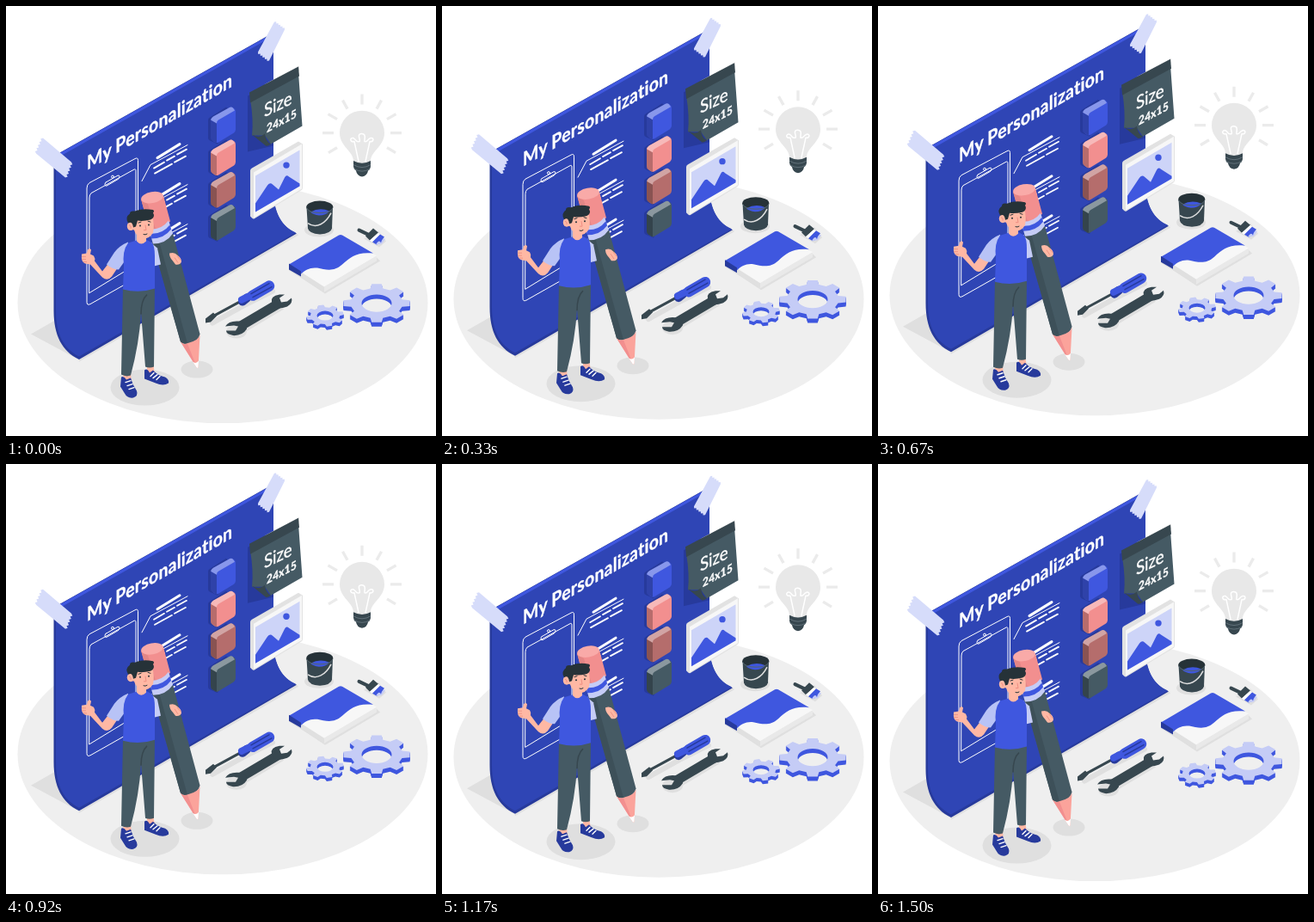
Write an HTML page that moves like this. It is 500x500 px and loops after 1540 ms.

```html
<!DOCTYPE html>
<html lang="en">
<head>
<meta charset="utf-8">
<title>My Personalization</title>
<style>
  html, body { margin: 0; height: 100%; overflow: hidden; background: #fff; }
  svg { display: block; width: 100vw; height: 100vh; }
  .blue { fill: #3f57df; } .navy { fill: #273a9c; } .pale { fill: #c5ccf6; }
  .gray { fill: #455a64; } .dark { fill: #37474f; } .ink { fill: #263238; }
  .skin { fill: #ffb8a4; } .shade { fill: #dfdfdf; }
  .line { fill: none; stroke: #fff; stroke-linecap: round; stroke-linejoin: round; }
  text { fill: #fff; stroke: #fff; stroke-width: .4; font-family: Lato, sans-serif; }
</style>
</head>
<body>
<svg viewBox="0 0 500 500">
  <defs>
    <g id="swatch">
      <path class="navy" d="M235 132Q235 130 237 129L256 117L262 122L246 160L237 156Q235 155 235 153Z"/>
      <path d="M238 133Q238 130 241 128L259 118Q262 116 264 118Q267 119 267 123V143Q267 145 265 147L247 158Q245 159 243 158L240 156Q238 155 238 152Z"/>
      <path fill="#000" opacity=".24" d="M238 132L245 136V158Q244 159 242 157L240 156Q238 155 238 152Z"/>
      <path fill="#fff" opacity=".38" d="M238 132Q239 129 241 128L259 118Q262 116 264 118L266 121L247 132Q245 133 245 136Z"/>
    </g>
    <g id="note" class="line">
      <path stroke-width="1" d="M158 203L168 184L211 161"/>
      <path stroke-width="3" d="M176 176L202 160"/>
      <path stroke-width="1.800" d="M172 188L184 181M187 179L196 174M199 172L210 166M173 194L193 183M196 181L209 174"/>
    </g>
  </defs>

  <g id="scene">
    <ellipse cx="252" cy="344.500" rx="238.500" ry="140" fill="#efefef"/>

    <!-- poster -->
    <path class="shade" d="M29 381L57 365L85 411Z"/>
    <path fill="#e0e0e0" d="M85 413L340 266L337 263L84 409Z"/>
    <path class="navy" d="M55.500 174L310 31V216C312 241 321 257 338 264L85 410.500C65 401 55.500 382 55.500 354Z"/>
    <path class="blue" d="M55.500 174.500L311 31V36L58 178Z"/>
    <path fill="#2f45b5" d="M58 177L311 34.500V216C312 241 321 256 337 263L85 407C67 398 58 381 58 354Z"/>
    <text transform="matrix(.866 -.5 0 1 94 190.500)" font-size="22.500" font-weight="700" letter-spacing=".25">My Personalization</text>

    <g class="line">
      <path d="M94 211Q94 207 97 205L150 177Q153.500 175 153.500 179V310Q153.500 314 151 316L98 346Q94 348 94 344Z"/>
      <path d="M97 222Q97 219 99 217L148 190Q151 188 151 191V300L97 333Z"/>
      <path d="M116 204.500L130 196.500Q132 196 132 198T130 201L117 208.500Q115 209 115 207T116 204.500Z"/>
      <circle cx="124" cy="198" r="1.500"/>
    </g>
    <use href="#note"/><use href="#note" y="46"/><use href="#note" y="92"/>
    <use href="#swatch" fill="#3f57df"/>
    <use href="#swatch" y="38" fill="#f28f8f"/>
    <use href="#swatch" y="75.500" fill="#b56d6c"/>
    <use href="#swatch" y="113.500" fill="#455a64"/>

    <!-- size note -->
    <path class="navy" d="M281 104L311 88V162L281 169Z"/>
    <path fill="#e6e6e6" d="M300 91L341 69V75Z"/>
    <path class="gray" d="M284 108L340 77L344.500 139L308 160L301 150L286 150Q288 132 284 108Z"/>
    <path class="dark" d="M283 100L340 70L341 81L284 112Z"/>
    <path class="dark" d="M286 149Q295 154 301 148Q302 157 308 160Q304 163 302 162Z"/>
    <text transform="matrix(.87 -.42 0 1 300 129)" font-size="21.500">Size</text>
    <text transform="matrix(.87 -.46 0 1 303 147)" font-size="13.500" font-weight="700" letter-spacing=".4">24x15</text>

    <!-- picture card -->
    <path fill="#e2e2e2" d="M284 191Q284 189 286 188L340 157L345 160V211Q345 213 343 214L290 246Q288 248 286 246L284 244Z"/>
    <path fill="#f7f7f7" d="M288 193L344 160V212L288 246Z"/>
    <path fill="#cdd4f8" d="M290 197L341.500 167V209L290 239Z"/>
    <path class="blue" d="M290 229L304 208Q307 204 310 207L317 213L324 199Q326 195 329 198L341.500 206V209L290 239Z"/>
    <circle class="blue" cx="326" cy="184.500" r="3.700"/>

    <!-- light bulb -->
    <path stroke="#ebebeb" stroke-width="3.300" d="M414 102V114M391.500 109L397 119M436.500 109L431 119M374.500 125L385 131M453.500 125L443 131M368 147H381M447 147H460M375 170L385 164M453 170L443 164"/>
    <path fill="#e8e8e8" d="M404 180C404 168 388 163 388 147A26 26 0 0 1 440 147C440 163 424 168 424 180Q414 185 404 180Z"/>
    <path class="line" stroke-width="1.500" d="M410 180L405 157C399 158 400 152 404 153C408 155 406 158 411 157C413 156 407 148 413.500 148S416 156 417 157C421 158 420 154 424 153C428 152 428 158 423 157L418 180"/>
    <path class="dark" d="M404 179.500Q414 185 424 179.500V185Q424 189 421 191Q420 197 414 198Q408 197 407 191Q404 189 404 186Z"/>
    <path fill="none" stroke="#6c7c85" stroke-width=".8" d="M404 184Q414 190 424 184M405 189Q414 194 423 189"/>

    <!-- bucket -->
    <ellipse class="shade" cx="364" cy="260" rx="17" ry="8"/>
    <path class="dark" d="M349.500 233L351 258Q352 264 365 265Q378 264 379 258L380 233Z"/>
    <ellipse class="ink" cx="364.800" cy="233" rx="15.500" ry="7"/>
    <path class="blue" d="M354 239Q365 233 376 238Q372 243 364 243Q357 242 354 239Z"/>
    <path fill="none" stroke="#53656e" d="M349.500 234Q352 240 365 240T380 234"/>
    <path fill="none" stroke="#e0e0e0" stroke-width="1.500" d="M351 252C361 259 372 252 378 240"/>

    <!-- brush -->
    <path class="shade" d="M416 270L433 261L442 273L434 280Z"/>
    <path stroke="#37474f" stroke-width="4" stroke-linecap="round" d="M410.500 260L421 265"/>
    <path class="dark" d="M418 267L427 258L433 263L423 272Z"/>
    <path fill="#fff" d="M423 272L433 263L435 265L426 274Z"/>
    <path class="blue" d="M426 274L435 265L440 268Q437 271 438 274L431 277Z"/>
    <path class="pale" d="M430 277Q434 270 436 275Q437 269 441 270L437 276Z"/>

    <!-- painted panel -->
    <path class="shade" d="M329 306L371 334L435 296L428 289Z"/>
    <path fill="#e0e0e0" d="M329 300V307L370 332V326Z"/>
    <path fill="#e9e9e9" d="M370 326V332L431 296V290Z"/>
    <path fill="#f7f7f7" d="M329 300L389 265L431 290L370 326Z"/>
    <path class="blue" d="M329 300L387 266Q389 265 391 266L427 287C408 285 401 291 391 300C381 309 372 306 362 304C354 303 348 306 343 311Z"/>
    <path class="navy" d="M329 299L343 308V314L329 306Z"/>

    <g id="gears"></g>

    <!-- screwdriver -->
    <g fill="none" stroke-linecap="round">
      <path stroke="#dfdfdf" stroke-width="6" d="M240 368L276 348L310 331"/>
      <path stroke="#37474f" stroke-width="3" d="M241 360L276 341"/>
      <path stroke="#273a9c" stroke-width="10" d="M275 343L280 339"/>
      <path stroke="#3f57df" stroke-width="12.500" d="M287 336L306 325"/>
      <path stroke="#3f57df" stroke-width="8" d="M274 341L290 333"/>
      <path stroke="#273a9c" stroke-width="1.500" d="M285 334L306 322M287 338L309 326"/>
    </g>
    <path class="dark" d="M232 363L241 356L245 360L238 367L232 368Z"/>

    <!-- wrench -->
    <g class="shade" transform="translate(1 4)">
      <path d="M270 369L315 342L322 348L275 376Z"/>
      <ellipse cx="267" cy="374" rx="12" ry="8"/>
    </g>
    <g class="dark">
      <path d="M268 368L312 342L322 349L278 375Z"/>
      <path d="M255 372Q259 365 271 366Q282 368 280 375Q275 383 264 382.500Q256 381 256 377L267 377L270 372L265 371Z"/>
      <path d="M309 344Q307 337 318 335L324 335L318 339L320 344L327 343L332 339Q334 345 327 349Q316 353 311 349Z"/>
    </g>

    <!-- pencil -->
    <ellipse class="shade" cx="222" cy="422" rx="18.500" ry="10"/>
    <ellipse class="shade" cx="161.500" cy="443" rx="40" ry="21"/>
    <path class="gray" d="M170 273L194 264L225.500 381Q224 388 216 391Q207 394 203 390Z"/>
    <path fill="#3d5059" d="M170 274L178 273L211 392Q205 393 203 390Z"/>
    <path fill="#fba39b" d="M203 390Q206 394 213 391Q224 388 225.500 382L223.500 420Q222 421 221 419Z"/>
    <path fill="#f28f8f" d="M203 390Q206 394 211 392L222 420Z"/>
    <path fill="#fff" d="M217 413Q221 416 224 412L223.500 420Q222 421 221 419Z"/>
    <path fill="#f28f8f" d="M157 224L183 220L191 250Q180 260 167 260Z"/>
    <path fill="#e38686" d="M157 224L165 230L174 259L167 260Z"/>
    <ellipse fill="#f9aaa8" cx="170" cy="222" rx="13" ry="6.500" transform="rotate(-10 170 222)"/>
    <path class="pale" d="M166 259Q181 260 189 249L194 264Q186 276 171 276Z"/>
    <path class="blue" d="M168 264Q182 265 190.500 254L192 259Q184 270 169 270Z"/>

    <!-- person -->
    <path class="pale" d="M170 276L176 281L180 300L172 302Z"/>
    <path class="skin" d="M136 426H145L146 438H137ZM163 414H171L173 428H165ZM152 262H163V279H152Z"/>
    <path class="navy" d="M134 431Q137 429 140 434L145 432Q147 440 152 447Q154 453 148 455Q141 456 138 450L133 442ZM161 423Q164 420 167 426L171 423Q176 429 185 431Q190 434 189 438Q183 442 174 438L161 433Z"/>
    <path class="line" stroke-width="1.400" d="M139 437L145 435M141 441L147 439M143 445L149 443M168 430L172 426M171 432L176 428M175 434L179 430"/>
    <path class="gray" d="M136 326L173 325L172 419Q167 421 162 419L157 356Q155 392 145 429Q140 431 134 428Z"/>
    <path fill="none" stroke="#37474f" stroke-width="1.500" d="M164 335Q157 341 157 358"/>
    <path class="skin" d="M119 299L112 308L103 296Q104 293 102 290L98 288L99 283Q97 280 95 283L94 287L88 288Q87 297 92 299L98 300L112 315Q118 320 123 314L131 302Z"/>
    <path fill="none" stroke="#ee9486" d="M88 291H93M88 294H93M90 297H94"/>
    <path fill="#b8c3f6" d="M142 274Q132 278 126 286L117 300Q124 306 131 306L141 292Z"/>
    <path class="blue" d="M142 275L152 272Q158 277 163 271L170 275Q173 279 173 290V328Q155 334 136 329L137 301Q135 284 142 275Z"/>
    <path class="skin" d="M152 269H163V273Q157 279 152 273Z"/>
    <ellipse class="skin" cx="145" cy="255.500" rx="4.200" ry="5"/>
    <path class="skin" d="M147 247L170 243Q173 254 171 263Q167 270 160 270Q151 268 149 260L145 259Z"/>
    <path class="ink" d="M142 252Q138 245 144 241Q144 237 150 238Q159 234 171 236.500Q173 238 171 240Q174 245 168 248Q159 250 153 249L151 256L148 257Q147 249 142 252Z"/>
    <g class="ink"><circle cx="156" cy="255" r="1"/><circle cx="166" cy="254" r="1"/></g>
    <path fill="none" stroke="#263238" stroke-linecap="round" d="M154 251.500L157 250.500M165 249.500L168 250.500M160 265Q162 266 164 264.500"/>
    <path fill="none" stroke="#ee8f83" d="M162 254L163 260L160 260M143 254Q146 255 145 258"/>
    <path class="skin" d="M190 287Q196 285 199 289Q204 292 204 297Q202 301 197 300L194 296Q190 292 190 287Z"/>
    <path fill="none" stroke="#ee9486" d="M196 292L200 298M199 290L203 295"/>

    <g id="tapes" fill="#d6dcfa"></g>
  </g>
</svg>
<script>
  const $ = id => document.getElementById(id);

  // Isometric gear: stacked lower copies form its thickness.
  function gear(cx, cy, r, hole, depth, offset = 0) {
    const teeth = 8, points = [];
    for (let i = 0; i < teeth; i++) {
      [[-.31, .78], [-.19, 1], [.19, 1], [.31, .78]].forEach(([turn, size]) => {
        const a = (i + turn + offset) / teeth * 2 * Math.PI;
        points.push(`${cx + r * size * Math.cos(a)} ${cy + r * size * .577 * Math.sin(a)}`);
      });
    }
    const ry = hole * .577;
    const d = `M${points.join('L')}ZM${cx - hole} ${cy}a${hole} ${ry} 0 1 0 ${2 * hole} 0a${hole} ${ry} 0 1 0 ${-2 * hole} 0Z`;
    let out = '';
    for (let y = depth; y >= 0; y--) {
      const fill = y ? 'blue' : 'pale';
      out += `<path class="${fill}" fill-rule="evenodd" transform="translate(0 ${y})" d="${d}"/>`;
    }
    return out;
  }

  function zigzag([x1, y1], [x2, y2], n = 5) {
    const nx = (y2 - y1) / 9, ny = (x1 - x2) / 9;
    return Array.from({ length: 2 * n + 1 }, (_, i) => {
      const k = i / (2 * n), s = i % 2;
      return `${x1 + (x2 - x1) * k + nx * s} ${y1 + (y2 - y1) * k + ny * s}`;
    }).join('L');
  }
  const tape = (a, b, c, d) => `<path d="M${zigzag(a, b)}L${zigzag(c, d)}Z"/>`;

  $('gears').innerHTML = gear(431, 345, 39, 17.5, 5) + gear(371, 359.5, 22, 9.5, 4, -.3);
  $('tapes').innerHTML =
    tape([35, 171], [43, 153], [76, 181], [69, 199]) +
    tape([312, 18], [324, 27], [306, 63], [293, 53]);

  // The whole scene floats up 10px and back in 1.5s at 24 steps per second, then rests briefly.
  function draw(now) {
    const t = now % 1540;
    const step = Math.min(36, Math.floor((t + 5) * .024));
    const lift = 10 * (1 - Math.abs(1 - step / 18));
    $('scene').setAttribute('transform', `translate(0 ${.6 - lift})`);
    requestAnimationFrame(draw);
  }
  draw(0);
</script>
</body>
</html>
```
